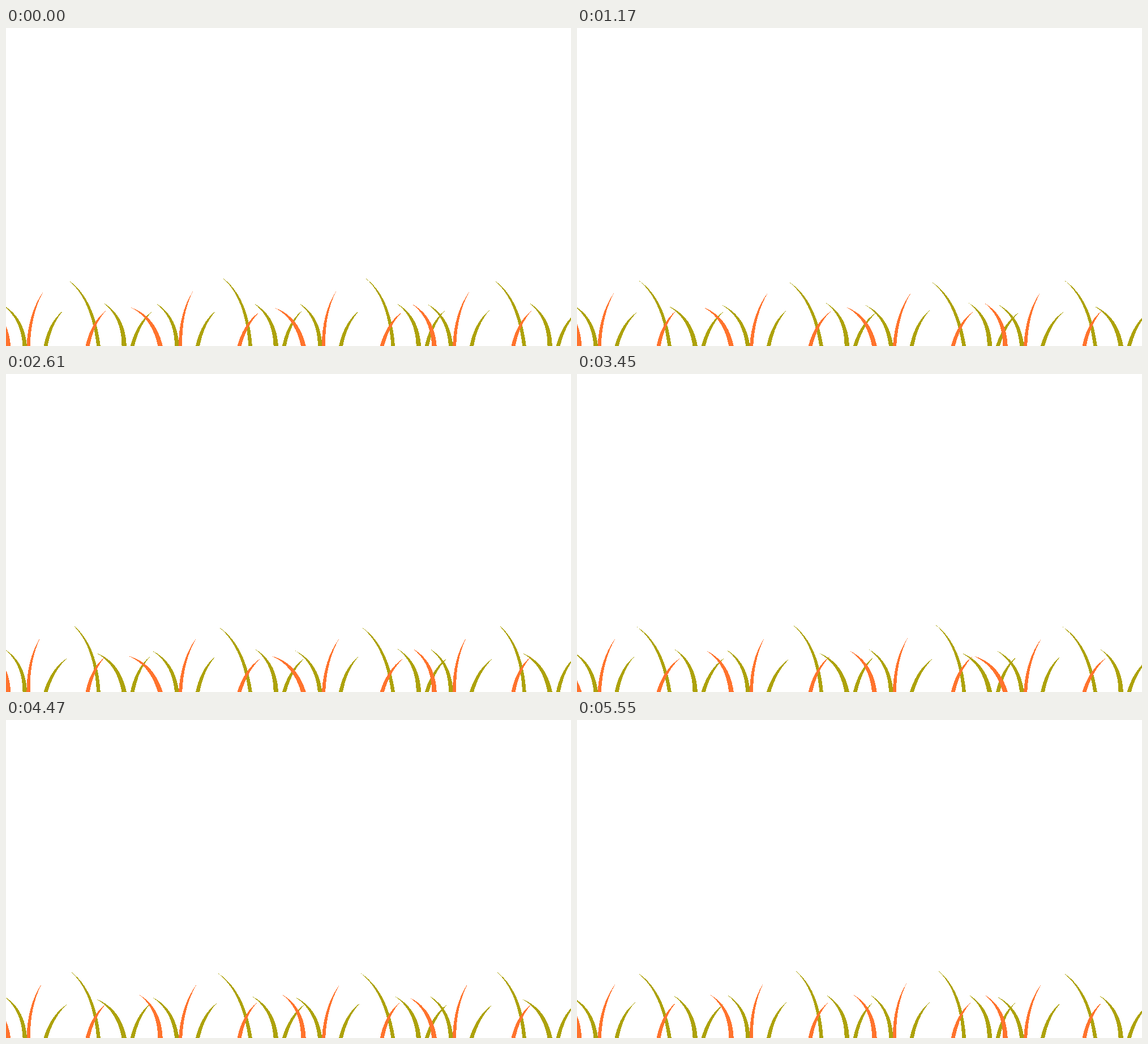
Recreate the animation shown at these times as an HTML page. Size 998 px wide and 561 px high, loop 5580 ms.

```html
<!DOCTYPE html>
<html lang="en">
<head>
<meta charset="utf-8">
<title>Swaying grass</title>
<style>
  html, body { margin: 0; width: 100%; height: 100%; overflow: hidden; background: #fff; }
  svg { display: block; width: 100%; height: 100%; shape-rendering: crispEdges; }
</style>
</head>
<body>
<svg id="stage" viewBox="0 0 998 561"></svg>
<script>
const NS = 'http://www.w3.org/2000/svg';
const GREEN = '#ada20b', ORANGE = '#ff732d';
const GROUND = 561, LOOP = 5580, STEP = 30;
const FULLNESS = 0.85; // how long a blade keeps its width towards the tip

// Blade outlines relative to the root: tip, bend point, root width, swing in degrees
const SHAPES = {
  tall:  { tip: [-47, -120], bend: [-5, -85], width: 6.6, swing: 6.1 },
  left:  { tip: [-37, -76.5], bend: [-1, -52], width: 8.3, swing: 10 },
  wide:  { tip: [-36.5, -76.5], bend: [-1, -52], width: 8.5, swing: 16 },
  slim:  { tip: [-37, -76.5], bend: [-1, -52], width: 7.5, swing: 6.4 },
  spike: { tip: [21.3, -97], bend: [-1, -57], width: 6.2, swing: 5 },
  right: { tip: [31.7, -63.3], bend: [8, -41], width: 7, swing: 6 },
};

// Sway rhythms: period in ms, starting phase in degrees, strength
const SWAY = {
  h: { period: 1790, phase: -37, gain: 1 },
  k: { period: 1450, phase: 49, gain: 1 },
  m: { period: 2143, phase: -93.5, gain: 1.09 },
  n: { period: 1760, phase: -8, gain: 1 },
  q: { period: 1200, phase: 117, gain: 1 },
};

// Tufts: [shape, colour, offset from the tuft's origin]
const TALL_TUFT = [['tall', GREEN, 0], ['right', ORANGE, -19.5], ['left', GREEN, 45.2], ['right', GREEN, 59.7]];
const LOW_TUFT = [['wide', ORANGE, 0], ['slim', GREEN, 29.3], ['spike', ORANGE, 35.6], ['right', GREEN, 66]];

// Tuft, origin, rhythm of each blade
const MEADOW = [
  [LOW_TUFT, 4, 'kmmn'],
  [TALL_TUFT, 163.5, 'mknm'],
  [LOW_TUFT, 272.5, 'qhhk'],
  [TALL_TUFT, 431.6, 'hqkh'],
  [LOW_TUFT, 525.4, 'qhhk'],
  [TALL_TUFT, 683.7, 'hqkh'],
  [LOW_TUFT, 756.5, 'kmmn'],
  [TALL_TUFT, 915.5, 'mknm'],
];

function outline({ tip: [tx, ty], bend: [bx, by], width }) {
  const half = width / 2, k = half * FULLNESS / Math.hypot(tx, ty);
  const nx = -ty * k, ny = tx * k;
  return `M${-half} 8V0Q${bx - nx} ${by - ny} ${tx} ${ty}` +
         `Q${bx + nx} ${by + ny} ${half} 0V8Z`;
}

const stage = document.getElementById('stage');
const blades = MEADOW.flatMap(([tuft, x, rhythm]) => tuft.map(([name, fill, dx], i) => {
  const shape = SHAPES[name];
  const path = document.createElementNS(NS, 'path');
  path.setAttribute('d', outline(shape));
  path.setAttribute('fill', fill);
  stage.append(path);
  return { path, x: x + dx, sway: SWAY[rhythm[i]], swing: Math.sign(shape.tip[0]) * shape.swing };
}));

function draw(t) {
  for (const { path, x, sway, swing } of blades) {
    const angle = (t / sway.period + sway.phase / 360) * 2 * Math.PI;
    const lean = swing * sway.gain * (1 - Math.cos(angle)) / 2;
    path.setAttribute('transform', `translate(${x} ${GROUND}) rotate(${lean.toFixed(3)})`);
  }
}

const start = performance.now();
function tick() {
  const t = (performance.now() - start) % LOOP;
  draw(Math.floor(t / STEP) * STEP);
  requestAnimationFrame(tick);
}
tick();
</script>
</body>
</html>
```
